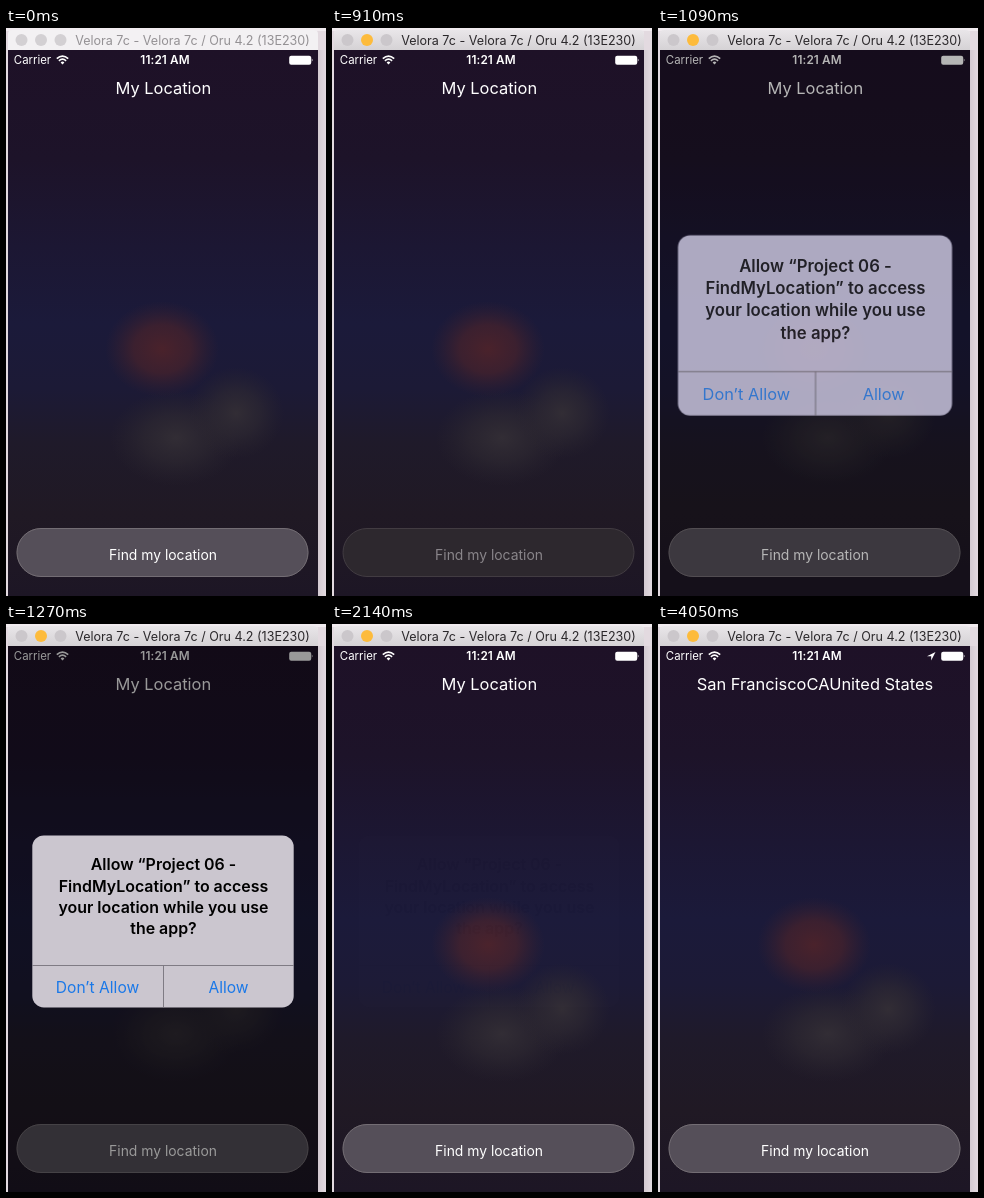
Write an HTML page that moves like this. It is 320 px wide and 568 px high and loops after 4100 ms.

```html
<!DOCTYPE html>
<html lang="en">
<head>
<meta charset="utf-8">
<title>My Location</title>
<style>
  html, body { margin: 0; width: 100%; height: 100%; overflow: hidden; background: #e2d9df; }
  svg { display: block; width: 100vw; height: 100vh; font-family: Inter, Roboto, sans-serif; }
  text { text-anchor: middle; }
  .white { fill: #fff; }
  .heading { font-size: 16.45px; }
  .status { font-size: 11.4px; }
  .clock { font-size: 11.8px; font-weight: 600; letter-spacing: .1px; }
  .wintitle { font-size: 12.55px; }
  .button { font-size: 13.9px; }
  .question { font-size: 15.95px; font-weight: 600; }
  .choice { font-size: 15.6px; fill: #1a78e8; }

  /* every animation shares one 4.1 s loop */
  .inactive, .active, .normal, .dim, .alert, .pop, .panel, .labels, .before, .after, .arrow {
    animation: 4.1s linear infinite;
  }
  .inactive { animation-name: hide-window; animation-timing-function: step-end; }
  .active { animation-name: show-window; animation-timing-function: step-end; }
  .before { animation-name: hide-result; animation-timing-function: step-end; }
  .after { animation-name: show-result; animation-timing-function: step-end; }
  .arrow { animation-name: show-arrow; animation-timing-function: step-end; }
  .normal { animation-name: press; }
  .dim { animation-name: dim; }
  .alert { animation-name: fade; }
  .panel { animation-name: tint; }
  .labels { animation-name: ink; }
  .pop { animation-name: pop; transform-origin: 157px 297.3px; }

  @keyframes hide-window { 0% { opacity: 1 } 19.51%, 100% { opacity: 0 } }
  @keyframes show-window { 0% { opacity: 0 } 19.51%, 100% { opacity: 1 } }
  @keyframes hide-result { 0% { opacity: 1 } 60.98%, 100% { opacity: 0 } }
  @keyframes show-result { 0% { opacity: 0 } 60.98%, 100% { opacity: 1 } }
  @keyframes show-arrow { 0% { opacity: 0 } 56.1%, 100% { opacity: 1 } }
  @keyframes press {
    0%, 19.5% { opacity: 1 }
    19.51%, 22.3% { opacity: 0 }
    26.59%, 100% { opacity: 1 }
  }
  @keyframes dim {
    0%, 23.07% { opacity: 0 }
    24.39% { opacity: .12 }
    26.59% { opacity: .29 }
    29.02%, 47.07% { opacity: .4 }
    51.8%, 100% { opacity: 0 }
  }
  @keyframes fade {
    0%, 23.07% { opacity: 0 }
    24.39% { opacity: .45 }
    25.51% { opacity: .72 }
    26.59% { opacity: .88 }
    29.02%, 47.07% { opacity: 1 }
    52.2% { opacity: .01 }
    52.4%, 100% { opacity: 0 }
  }
  @keyframes tint {
    0%, 24.39% { fill: #bcb9e0 }
    29.02%, 100% { fill: #cbc6cf }
  }
  @keyframes ink {
    0%, 24.39% { opacity: .65 }
    29.02%, 100% { opacity: 1 }
  }
  @keyframes pop {
    0%, 23.07% { transform: scale(1.2) }
    24.39% { transform: scale(1.118) }
    25.51% { transform: scale(1.077) }
    26.59% { transform: scale(1.049) }
    27.8% { transform: scale(1.024) }
    29.02% { transform: scale(1.01) }
    30.98%, 100% { transform: scale(1) }
  }
</style>
</head>
<body>
<svg viewBox="0 0 320 568" xmlns="http://www.w3.org/2000/svg">
  <defs>
    <linearGradient id="sky" x2="0" y2="1">
      <stop offset="0" stop-color="#1e1127"/>
      <stop offset=".2" stop-color="#1d1329"/>
      <stop offset=".36" stop-color="#1c1733"/>
      <stop offset=".5" stop-color="#1b1a3a"/>
      <stop offset=".62" stop-color="#1c1a36"/>
      <stop offset=".72" stop-color="#1f1a2a"/>
      <stop offset=".85" stop-color="#201924"/>
      <stop offset="1" stop-color="#1d1625"/>
    </linearGradient>
    <linearGradient id="bar" x2="0" y2="1">
      <stop offset="0" stop-color="#e9e6e9"/>
      <stop offset="1" stop-color="#d5d2d5"/>
    </linearGradient>
    <linearGradient id="edge">
      <stop offset="0" stop-color="#d3cad1"/>
      <stop offset="1" stop-color="#e3dae0"/>
    </linearGradient>
    <radialGradient id="red">
      <stop offset="0" stop-color="#4a222b"/>
      <stop offset=".5" stop-color="#46222c" stop-opacity=".75"/>
      <stop offset="1" stop-color="#38202f" stop-opacity="0"/>
    </radialGradient>
    <radialGradient id="grey">
      <stop offset="0" stop-color="#322d35"/>
      <stop offset=".5" stop-color="#2f2a32" stop-opacity=".6"/>
      <stop offset="1" stop-color="#2a252f" stop-opacity="0"/>
    </radialGradient>
    <path id="bar-shape" d="M2 22V6Q2 2 6 2H308Q312 2 312 6V22Z"/>
    <path id="pill" d="M35 500.5H278A24 24 0 0 1 278 548.5H35A24 24 0 0 1 35 500.5Z"/>
  </defs>

  <!-- desktop and window bar -->
  <rect width="320" height="568" fill="#e3dae0"/>
  <rect width="320" height="3" fill="#f1ebef"/>
  <rect x="312" y="22" width="8" height="546" fill="url(#edge)"/>
  <use href="#bar-shape" fill="#f3f1f3"/>
  <g class="inactive">
    <g fill="#d3d0d3">
      <circle cx="15.5" cy="12" r="6"/><circle cx="35" cy="12" r="6"/><circle cx="54.5" cy="12" r="6"/>
    </g>
    <text class="wintitle" x="186.5" y="16.5" fill="#949194">Velora 7c - Velora 7c / Oru 4.2 (13E230)</text>
  </g>
  <g class="active">
    <use href="#bar-shape" fill="url(#bar)"/>
    <g fill="#cbc7cb">
      <circle cx="15.5" cy="12" r="6"/><circle cx="54.5" cy="12" r="6"/>
    </g>
    <circle cx="35" cy="12" r="6" fill="#fdbb3c"/>
    <text class="wintitle" x="186.5" y="16.5" fill="#2b282b">Velora 7c - Velora 7c / Oru 4.2 (13E230)</text>
  </g>

  <!-- phone screen -->
  <rect x="2" y="22" width="310" height="546" fill="url(#sky)"/>
  <ellipse cx="170" cy="410" rx="66" ry="48" fill="url(#grey)"/>
  <ellipse cx="230" cy="385" rx="48" ry="46" fill="url(#grey)"/>
  <ellipse cx="156" cy="321" rx="57" ry="48" fill="url(#red)"/>

  <g class="white status">
    <text x="26.5" y="36.3">Carrier</text>
    <text class="clock" x="159" y="36.3">11:21 AM</text>
  </g>
  <g fill="none" stroke="#fff" stroke-width="1.7">
    <path d="M50.8 30.6Q56.5 25.6 62.2 30.6"/>
    <path d="M52.9 32.8Q56.5 29.6 60.1 32.8"/>
  </g>
  <path class="white" d="M54.6 34.4Q56.5 32.8 58.4 34.4L56.5 36.4Z"/>
  <path class="white arrow" d="M277.5 28L269 32.3H273.2V36.5Z"/>
  <rect class="white" x="283.2" y="27.7" width="22" height="9" rx="2"/>
  <path class="white" d="M305.8 30.6Q307.6 32.2 305.8 33.8Z"/>

  <text class="white heading before" x="157.3" y="66">My Location</text>
  <text class="white heading after" x="157" y="66">San FranciscoCAUnited States</text>

  <use href="#pill" fill="#2d282e" stroke="#423c42"/>
  <text class="button" x="157" y="532.3" fill="#89858a">Find my location</text>
  <g class="normal">
    <use href="#pill" fill="#554f59" stroke="#736d74"/>
    <text class="white button" x="157" y="532.3">Find my location</text>
  </g>

  <rect class="dim" x="2" y="22" width="310" height="546"/>

  <!-- permission alert -->
  <g class="alert">
    <g class="pop">
      <rect class="panel" x="26.3" y="211.4" width="261.4" height="172" rx="11.5"/>
      <path d="M26.3 341.5H287.7M157.5 341.5V383.4" stroke="#77737c" stroke-width=".9"/>
      <g class="labels">
        <g class="question">
          <text x="157.5" y="246.3">Allow “Project 06 -</text>
          <text x="157.5" y="267.5">FindMyLocation” to access</text>
          <text x="157.5" y="288.7">your location while you use</text>
          <text x="157.5" y="310">the app?</text>
        </g>
        <text class="choice" x="91.5" y="369">Don’t Allow</text>
        <text class="choice" x="222.5" y="369">Allow</text>
      </g>
    </g>
  </g>
</svg>
</body>
</html>
```
